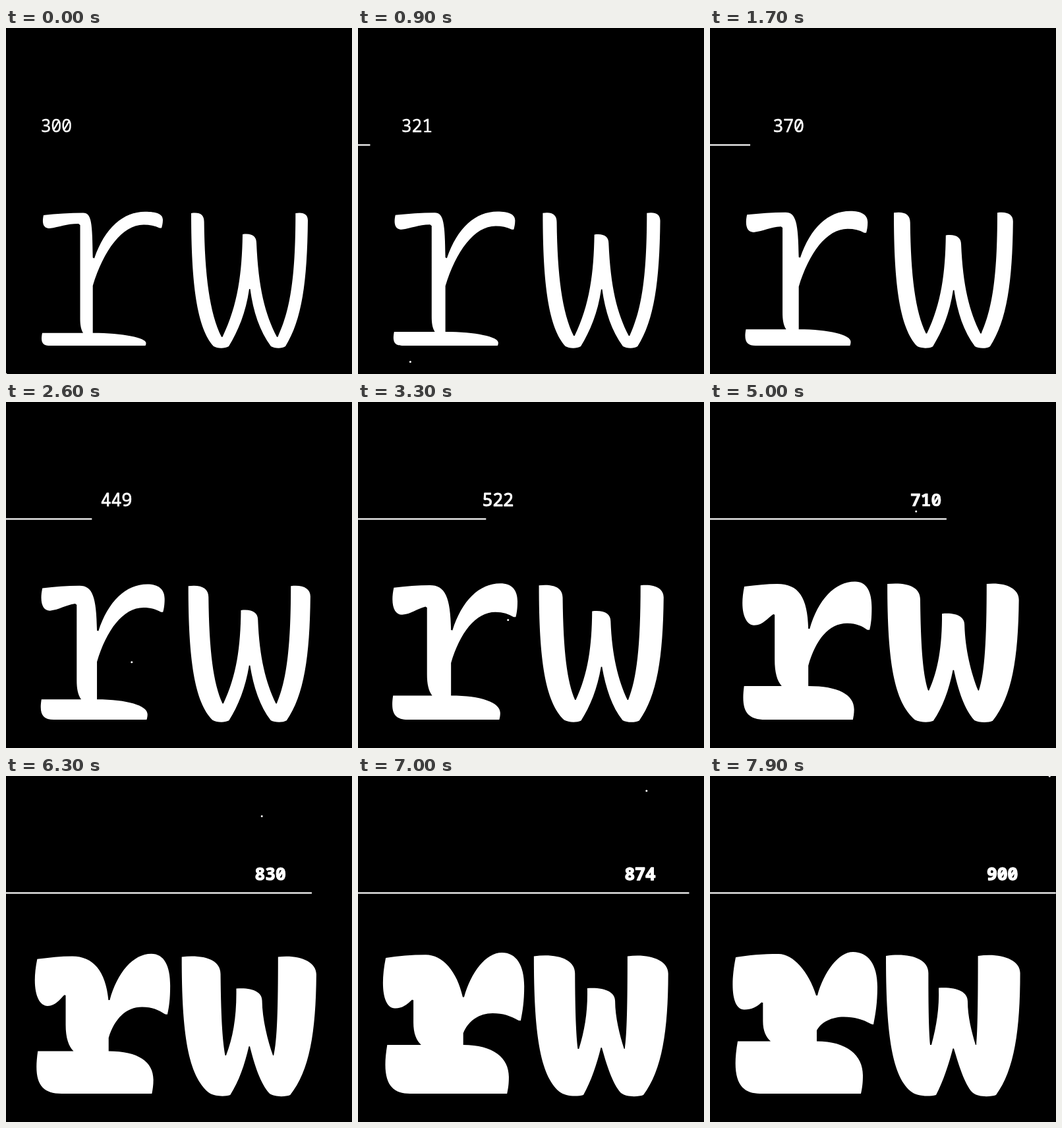
An HTML page for the animation above (8 s loop, 525x525 px).

```html
<!DOCTYPE html>
<html lang="en">
<head>
<meta charset="utf-8">
<title>Variable weight</title>
<style>
  html, body { margin: 0; height: 100%; overflow: hidden; background: #000; }
  svg { display: block; width: 100%; height: 100%; fill: #fff; }
  text {
    font: 27px "Noto Sans Mono", "DejaVu Sans Mono", monospace;
    letter-spacing: -.45px;
    stroke: #fff;
    stroke-linejoin: round;
  }
</style>
</head>
<body>
<svg viewBox="0 0 525 525">
  <rect id="rule" y="176.4" height="2.2"/>
  <text id="label" y="158"></text>
  <path id="r"/>
  <path id="w"/>
  <circle id="dot" r="1.5"/>
</svg>
<script>
const SIZE = 525, LOOP = 8000, STEP = 100;
const LIGHT = 300, HEAVY = 800, BLACK = 900;

// Outlines of each letter at the light, heavy and black weights.
const glyphs = {
  r: [
    `M57 284 C76 282 97 280.5 117 280.5 C130 280.5 131 296 131.7 348.5 L134 349.5
     C150 303 178 278.7 211 278.7 C228 278.7 238 282 238 291 C238 296 237 300 236 303.5 L233 303.5
     C226 300 218 298.5 209 298.5 C176 298.5 148 338 131.7 391 L131.7 462.7
     C178 462.7 212.5 470 212.5 478 C212.5 480 212 481 211.5 482 L66 482 C56 482 52 477 55 462.7 L117 462.7
     C113 456 112.5 448 112.5 440 L112.5 299 L110 297 C91 297 82 302 66 304 C56 304 54.5 295 57 284Z`,
    `M51 279 C69 277 84 275 99 275 C135 275 152 296 153 343 L155 343
     C167 299 192 271 222 271 C240 271 247 289 247 317 C247 335 246 345 243.5 355 L240 355
     C232 349 223 344 208 344 C181 344 163 366 153 402 L153 424
     C198 424 220 438 220 464 C220 471 219 477 218 482 L88 482 C53.5 482 46 463.5 51 424 L107 424
     C99.5 416 95 403 95 380 L95 328 L93 327.5 C86 335 80 346.5 68 346.5 C53 346.5 42 322 51 279Z`,
    `M39 275 C58 272 80 270 104 270 C126 270 150 297 161 333 L163 333
     C173 297 195 267 217 267 C240 267 254 286 254 320 C254 345 251 362 248 377 L245 376.5
     C231 369 219 365.5 203 365.5 C185 365.5 169 373 162 386 L162 402.5
     C208 402.5 232 424 232 454 C232 466 231 473 229 482 L76 482 C48 482 31 465 42 402.5 L92 402.5
     C85 396 80.3 387 80.3 372 L80.3 344 L78 343.5 C70 351 63 354.5 52 354.5 C34 354.5 30 320 39 275Z`
  ],
  w: [
    `M281 281 C294 279 300.6 283 300.6 294 C301.5 375 309 433 327 468.7 L328.5 468.7
     C352 420 358 372 359 313 C373 311 380 316 380 326 C383 395 393 434 411 468.7 L412.5 468.7
     C430 430 439.3 385 439.3 281 C452 279 458 283 458 292 C457 385 449 443 424 483
     C418 487 407 486 402 483 C385 460 375 430 370.5 396 L369 396
     C364 432 352 460 338 483 C331 487 320 486 315 483 C290 455 281 390 281 281Z`,
    `M266.5 275 C301 272 323 280 323 301 C324 387 328 414 332 431 L333 431
     C345 404 351 370 350.5 323 C374 321 387.5 328 387.5 340.5 C388 371 397 407 406 431 L407 431
     C414 408 415.5 354 415.5 275 C446 272 471 282 471 302 C470 391 460 448 430 484
     C423 487 408 487 401 483 C386 467 377 439 370 409 L368.5 409
     C362 439 353 464 339 484 C331 487 318 486 310 482 C277 455 266.5 396 266.5 275Z`,
    `M267 273 C300 268 331.4 276 331.4 299 C331.4 350 332 385 334 408 L336 408
     C344 378 348 352 347 321.5 C374 320 391 327 391 342 C391 365 397 388 403 408 L404 408
     C406 385 406.6 345 406.6 273 C438 268 470.6 277 470.6 299 C470.6 385 462 446 434 484
     C426 487 407 488 398 480 C386 467 377 437 370 413.5 L368.5 413.5
     C362 438 354 463 343 484 C331 487 313 486 304 478 C275 453 267 385 267 273Z`
  ]
};

const $ = id => document.getElementById(id);
const number = /[\d.]+/g;

function mix(from, to, k) {
  const ends = to.match(number);
  let i = 0;
  return from.replace(number, v => +v + (ends[i++] - v) * k);
}

function outline([light, heavy, black], weight) {
  return weight < HEAVY
    ? mix(light, heavy, (weight - LIGHT) / (HEAVY - LIGHT))
    : mix(heavy, black, (weight - HEAVY) / (BLACK - HEAVY));
}

function draw(now) {
  const s = Math.floor(now % LOOP / STEP) * STEP / LOOP;
  // The dot follows the easing curve: a cubic Bézier (.5, 0, .5, 1).
  const x = 1.5 * s * (1 - s) + s ** 3;
  const y = s * s * (3 - 2 * s);
  const weight = LIGHT + (BLACK - LIGHT) * y;

  for (const id in glyphs) $(id).setAttribute("d", outline(glyphs[id], weight));
  $("rule").setAttribute("width", SIZE * y);
  $("dot").setAttribute("cx", SIZE * x);
  $("dot").setAttribute("cy", SIZE * (1 - y));

  // A growing stroke fills the steps between the regular and bold faces.
  const bold = y > .5;
  const label = $("label");
  label.textContent = Math.round(weight);
  label.setAttribute("x", SIZE * (.1 + .7 * y));
  label.style.fontWeight = bold ? 700 : 400;
  label.style.strokeWidth = bold ? 2.8 * (y - .5) : .3 + 2 * y;
}

let start;
function tick(now) {
  start ??= now;
  draw(now - start);
  requestAnimationFrame(tick);
}
draw(0);
requestAnimationFrame(tick);
</script>
</body>
</html>
```
